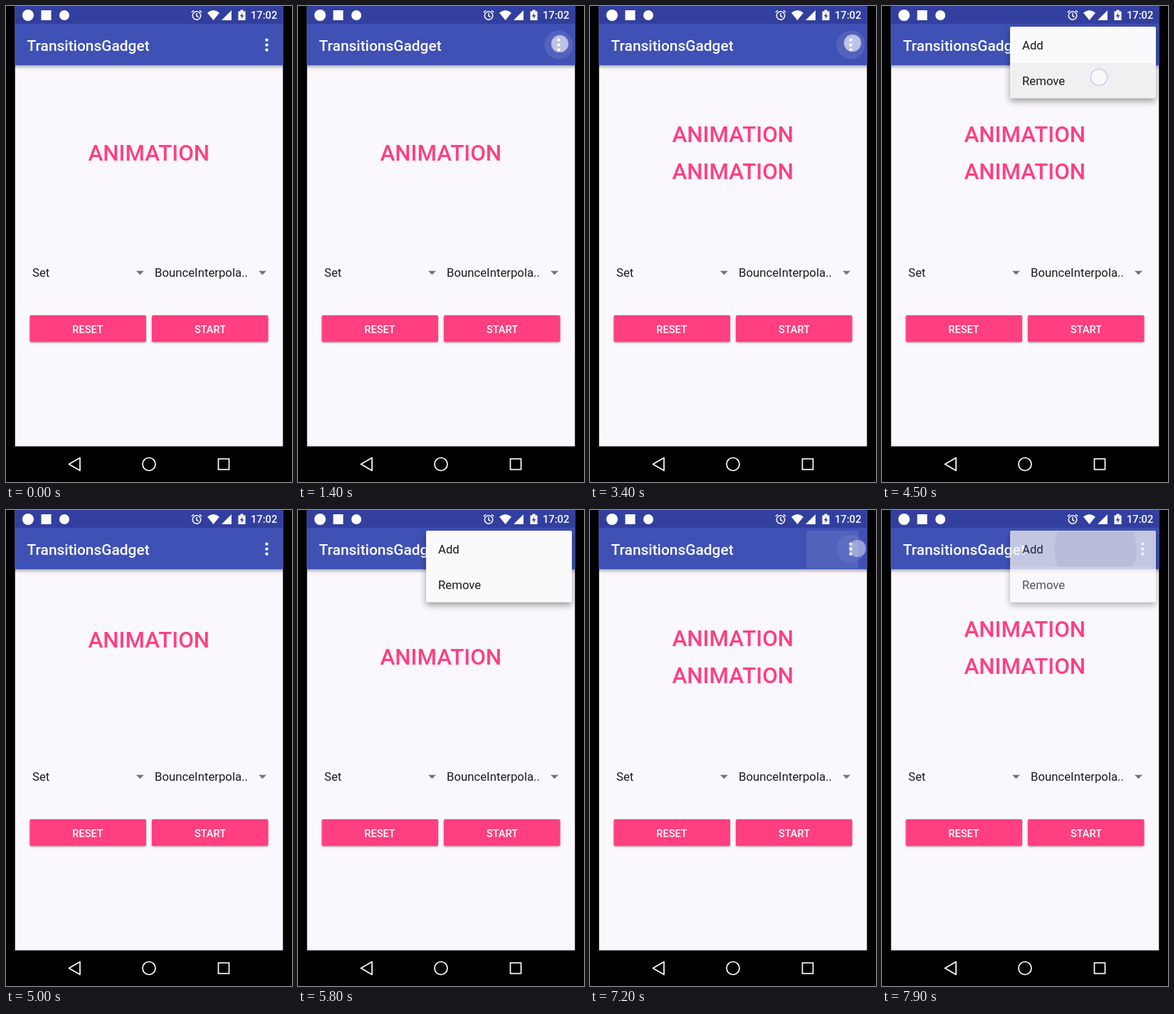
Recreate the animation shown at these times as an HTML page. Size 402x668 px, loop 8000 ms.

```html
<!DOCTYPE html>
<html lang="en">
<head>
<meta charset="utf-8">
<title>Layout transitions</title>
<style>
  html, body { margin: 0; width: 100%; height: 100%; overflow: hidden; background: #000; }
  svg { display: block; width: 402px; height: 668px; font-family: Roboto, sans-serif; }
  .medium { font-weight: 500; }
  .white { fill: #fff; }
  .label { font-size: 16.75px; fill: #1b1b1d; }
  .caption { font-size: 14.6px; font-weight: 500; fill: #fff; text-anchor: middle; }
  .headline { font-size: 31.4px; font-weight: 500; fill: #ff3f80; text-anchor: middle; }
  .button { fill: #ff3f80; filter: drop-shadow(0 1.5px 1.5px rgba(0, 0, 0, .32)); }
  .bar { filter: drop-shadow(0 2px 2.5px rgba(0, 0, 0, .4)); }
  .panel { fill: #faf9fc; filter: drop-shadow(0 4px 5px rgba(0, 0, 0, .38)); }
  .line { fill: none; stroke: #fff; stroke-width: 1.7; }
</style>
</head>
<body>
<svg viewBox="0 0 402 668">
  <defs>
    <clipPath id="screen"><rect x="12.5" width="377" height="618"/></clipPath>
    <clipPath id="reveal"><rect id="window"/></clipPath>
    <clipPath id="row"><rect id="rowBox" x="180" width="205" height="49.5"/></clipPath>
  </defs>
  <rect width="402" height="668"/>
  <g clip-path="url(#screen)">
    <rect x="12.5" width="377" height="618" fill="#faf8fc"/>
    <rect class="bar" x="0" y="0" width="402" height="83" fill="#3f51b5"/>
    <rect x="12.5" width="377" height="25" fill="#323f9f"/>

    <g class="white">
      <circle cx="31" cy="13" r="8"/>
      <rect x="49.500" y="6" width="14" height="14"/>
      <circle cx="82" cy="13" r="7"/>
      <path d="M283 9.500Q291.500 2.500 300 9.500L291.500 20Z"/>
      <path d="M317 6V20H303Z"/>
      <path d="M326.500 7.500H329.500V5.500H333.500V7.500H336.500V20H326.500Z"/>
    </g>
    <path d="M332.500 9L328.800 14.500H331.300L330.600 18.500L334.300 13H331.800Z" fill="#323f9f"/>
    <g class="line" style="stroke-width:1.5">
      <circle cx="268" cy="13.500" r="5.700"/>
      <path d="M268 10V14L270.500 15.500M260.800 9L264 6.200M275.200 9L272 6.200"/>
    </g>
    <text class="white medium" x="344" y="18" font-size="14.66">17:02</text>

    <text class="white medium" x="29.500" y="62.500" font-size="20.9">TransitionsGadget</text>
    <circle id="glow" class="white" cx="366.500" cy="54.500" r="20"/>
    <g class="white">
      <circle cx="366.500" cy="47.600" r="2.200"/>
      <circle cx="366.500" cy="54.600" r="2.200"/>
      <circle cx="366.500" cy="61.600" r="2.200"/>
    </g>

    <text id="first" class="headline" x="200.800">ANIMATION</text>
    <text id="second" class="headline" x="200.800">ANIMATION</text>

    <text class="label" x="37" y="380">Set</text>
    <text class="label" x="209" y="380">BounceInterpola..</text>
    <path d="M183 371.700h11l-5.500 5.500ZM355 371.700h11l-5.500 5.500Z" fill="#757477"/>

    <rect class="button" x="33.500" y="434" width="163.500" height="37.500" rx="2"/>
    <rect class="button" x="205" y="434" width="163.500" height="37.500" rx="2"/>
    <text class="caption" x="115" y="458.500">RESET</text>
    <text class="caption" x="287" y="458.500">START</text>

    <g id="menu" clip-path="url(#reveal)">
      <rect class="panel" x="180" y="29" width="205" height="100.500" rx="2"/>
      <g clip-path="url(#row)">
        <rect id="shade" x="180" y="29" width="205" height="100.500"/>
        <circle id="ripple" fill-opacity=".06"/>
      </g>
      <text class="label" x="197" y="60.700">Add</text>
      <text class="label" x="197" y="110.700">Remove</text>
    </g>
    <circle id="touch" r="11.500" fill="#fff" fill-opacity=".62" stroke="#c3bce8" stroke-opacity=".75" stroke-width="1.500"/>
  </g>
  <g class="line">
    <path d="M88.500 643L104 634V652Z" stroke-linejoin="round"/>
    <circle cx="201" cy="643" r="9"/>
    <rect x="298.500" y="635.500" width="15" height="15"/>
  </g>
</svg>
<script>
const LOOP = 8000, STEP = 100, PITCH = 52.5;

// Overflow tap (press, up, x, y), menu opening, item tap, then the action and its change in line count.
const rounds = [
  { tap: [1300, 1450, 368, 53], open: 1500, pick: [2050, 2200, 282, 51], act: 2350, add: 1 },
  { tap: [3400, 3500, 369, 52], open: 3550, pick: [4200, 4550, 305, 100], act: 4650, add: -1 },
  { tap: [5250, 5400, 370, 53], open: 5400, pick: [5900, 6050, 290, 53], act: 6150, add: 1 },
  { tap: [7000, 7150, 376, 54], open: 7150, pick: [7500, 7700, 300, 55], act: 7750, add: 1 }
];

const $ = id => document.getElementById(id);
const set = (id, attrs) => {
  for (const key in attrs) $(id).setAttribute(key, attrs[key]);
};
const ramp = (t, start, length) => Math.min(1, Math.max(0, (t - start) / length));
const smooth = p => (1 - Math.cos(Math.PI * p)) / 2;
const pressure = (t, [down, up]) => t < down ? 0 : 1 - ramp(t, up, 150);

function drawLines(t) {
  let count = 1, alpha = 0;
  for (const { act, add } of rounds) {
    const early = ramp(t, act, 300), late = ramp(t, act + 300, 300);
    count += add * smooth(add > 0 ? early : late);
    if (count <= 2) alpha += add * smooth(add > 0 ? late : early);
  }
  const y = 217 - (count - 1) * PITCH / 2;
  set('first', { y });
  set('second', { y: y + PITCH, opacity: Math.min(1, alpha) });
}

function drawMenu(t) {
  const round = rounds.find(r => t >= r.open && t < r.act + 300);
  if (!round) return set('menu', { opacity: 0 });
  const { open, pick: [down, up, x, y], act } = round;
  const p = ramp(t, open, 300), grow = 1 - (1 - p) ** 2;
  const left = 366 - 202 * grow, right = 366 + 36 * grow;
  set('menu', { opacity: p ** 1.3 * (1 - ramp(t, act, 300) ** 2) });
  set('window', { x: left, y: 26, width: right - left, height: 28 + 92 * grow });
  set('rowBox', { y: y < 80 ? 30 : 80 });
  set('shade', { 'fill-opacity': .04 * ramp(t, down + 100, 150) });
  set('ripple', { cx: x, cy: y, r: Math.max(0, t - up) * .29 });
}

function drawTouch(t) {
  const taps = rounds.flatMap(r => [r.tap, r.pick]);
  const tap = taps.find(q => pressure(t, q) > 0);
  set('touch', tap ? { cx: tap[2], cy: tap[3], opacity: pressure(t, tap) } : { opacity: 0 });
  const glow = Math.max(...rounds.map(r => pressure(t, r.tap)));
  set('glow', { opacity: .1 * glow });
}

function draw(now) {
  const t = Math.floor(now % LOOP / STEP) * STEP;
  drawLines(t);
  drawMenu(t);
  drawTouch(t);
}

const start = performance.now();
function tick() {
  draw(performance.now() - start);
  requestAnimationFrame(tick);
}
tick();
</script>
</body>
</html>
```
